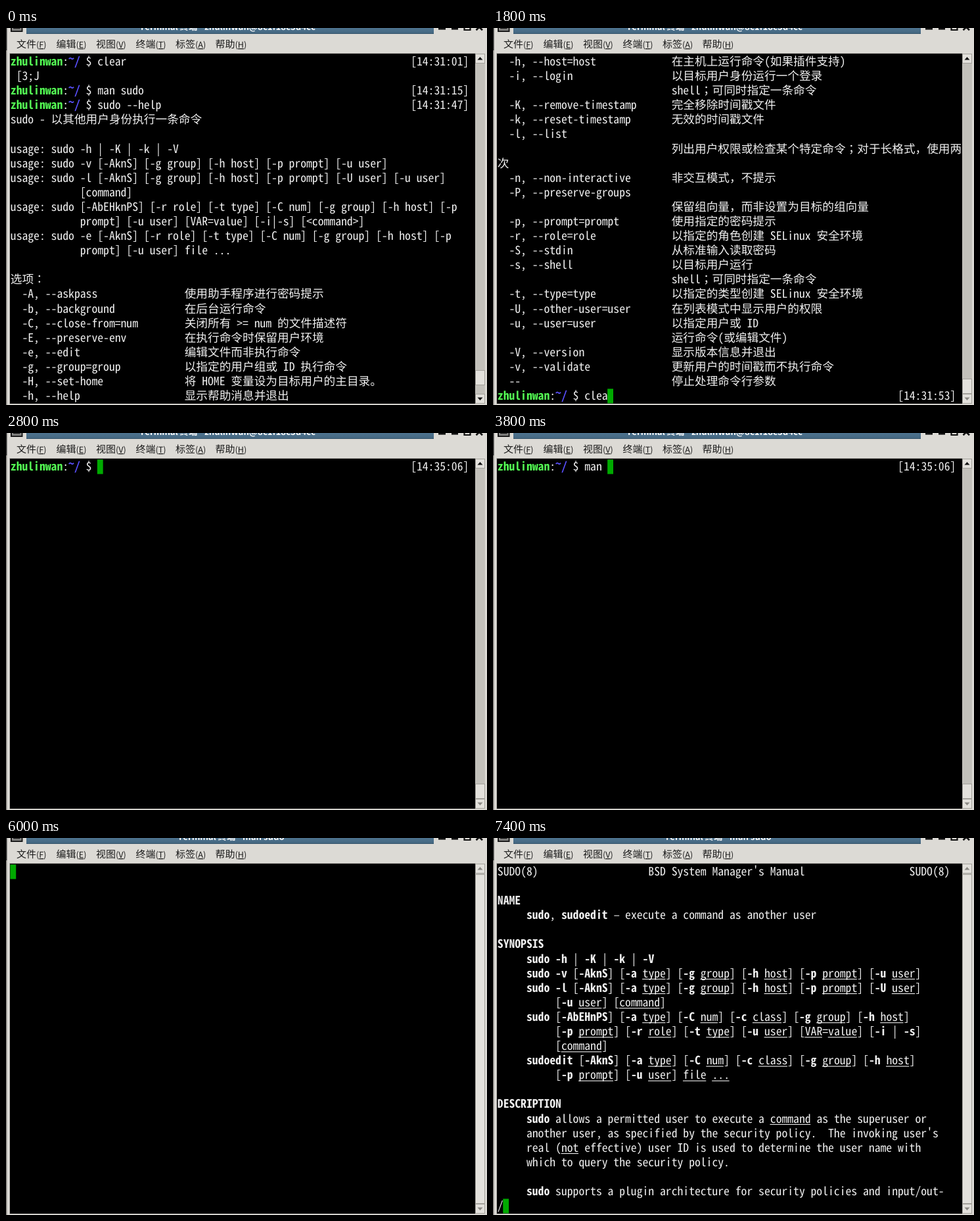
These frames come from a looping animation (732 px wide and 573 px high, 8 s). An HTML page:

```html
<!DOCTYPE html>
<html lang="zh-CN">
<head>
<meta charset="utf-8">
<title>Terminal</title>
<style>
  html, body { margin: 0; width: 100%; height: 100%; overflow: hidden; background: #dcdad5; }
  svg { display: block; width: 732px; height: 573px; }
  text { white-space: pre; text-rendering: geometricPrecision; font-kerning: none; }
  .ui { font-family: "Noto Sans CJK SC", "Noto Sans", sans-serif; fill: #1c1c1c; }
  .latin { font-family: "Noto Sans Mono CJK SC", "Noto Sans Mono", monospace; font-variant-ligatures: none; }
  .han { font: 17.66px "Noto Sans CJK SC", sans-serif; }
  .mid { font: 17.66px "Noto Sans CJK JP", sans-serif; }
  #screen { fill: #f0f0f0; }
  #screen .bold { font-weight: 700; }
  #screen .user { font-weight: 700; fill: #54ff54; }
  #screen .path { font-weight: 700; fill: #5a50ff; }
  #screen .inv { fill: #000; }
  .btn { fill: #e3e1dc; stroke: #a3a19b; }
</style>
</head>
<body>
<svg viewBox="0 0 732 573">
  <defs>
    <linearGradient id="bar" x1="0" y1="0" x2="0" y2="1">
      <stop offset="0" stop-color="#4f7591"/>
      <stop offset="1" stop-color="#43667f"/>
    </linearGradient>
  </defs>
  <rect width="732" height="573" fill="#dcdad5"/>
  <rect width="1.5" height="34" fill="#2b2b2b"/>
  <rect y="34" width="1.5" height="539" fill="#85837f"/>
  <rect x="8" y="-8" width="16.5" height="13" fill="#8b8b89" stroke="#1a1a1a" stroke-width="2"/>
  <rect x="11" y="-4" width="10.5" height="5.5" fill="#2a2a2a"/>
  <rect x="31" y="-1" width="620" height="10" fill="url(#bar)"/>
  <rect x="31" y="8" width="620" height="1" fill="#34536a"/>
  <text id="title" class="ui" y="2.6" font-size="13.2" font-weight="700" style="fill:#fff"></text>
  <g fill="#111">
    <rect x="658" y="0" width="11" height="2.6"/>
    <rect x="678" y="0" width="10" height="2.6"/>
    <path d="M697.5 -6V3H706.5V-6" fill="none" stroke="#111" stroke-width="2.2"/>
    <path d="M715.5 3.2L725 -6M725 3.2L715.5 -6" stroke="#111" stroke-width="2.6"/>
  </g>
  <g id="menu"></g>
  <rect x="5" y="38" width="709.5" height="533.5" fill="#b2b0ab"/>
  <rect x="6" y="39" width="708" height="532" fill="#000"/>
  <rect x="714" y="39" width="15" height="532" fill="#c3c1bb"/>
  <rect class="btn" x="714.5" y="39.5" width="14" height="14"/>
  <rect class="btn" x="714.5" y="556.5" width="14" height="14"/>
  <path id="up" d="M717.5 48.5H725.5L721.5 44Z"/>
  <path id="down" d="M717.5 561.5H725.5L721.5 566Z"/>
  <rect id="thumb" class="btn" x="714.5" width="14"/>
  <g id="screen"></g>
</svg>
<script>
const $ = id => document.getElementById(id);
const CELL = 8.83, ROW = 22.09, LEFT = 6.4, TOP = 40.3, DESC = 30;
const USER = 'zhulinwan';

const HELP = `sudo - 以其他用户身份执行一条命令

usage: sudo -h | -K | -k | -V
usage: sudo -v [-AknS] [-g group] [-h host] [-p prompt] [-u user]
usage: sudo -l [-AknS] [-g group] [-h host] [-p prompt] [-U user] [-u user]
            [command]
usage: sudo [-AbEHknPS] [-r role] [-t type] [-C num] [-g group] [-h host] [-p
            prompt] [-u user] [VAR=value] [-i|-s] [<command>]
usage: sudo -e [-AknS] [-r role] [-t type] [-C num] [-g group] [-h host] [-p
            prompt] [-u user] file ...

选项：
  -A, --askpass\t使用助手程序进行密码提示
  -b, --background\t在后台运行命令
  -C, --close-from=num\t关闭所有 >= num 的文件描述符
  -E, --preserve-env\t在执行命令时保留用户环境
  -e, --edit\t编辑文件而非执行命令
  -g, --group=group\t以指定的用户组或 ID 执行命令
  -H, --set-home\t将 HOME 变量设为目标用户的主目录。
  -h, --help\t显示帮助消息并退出`;

const OPTS = `  -h, --host=host\t在主机上运行命令(如果插件支持)
  -i, --login\t以目标用户身份运行一个登录
\tshell；可同时指定一条命令
  -K, --remove-timestamp\t完全移除时间戳文件
  -k, --reset-timestamp\t无效的时间戳文件
  -l, --list
\t列出用户权限或检查某个特定命令；对于长格式，使用两
次
  -n, --non-interactive\t非交互模式，不提示
  -P, --preserve-groups
\t保留组向量，而非设置为目标的组向量
  -p, --prompt=prompt\t使用指定的密码提示
  -r, --role=role\t以指定的角色创建 SELinux 安全环境
  -S, --stdin\t从标准输入读取密码
  -s, --shell\t以目标用户运行
\tshell；可同时指定一条命令
  -t, --type=type\t以指定的类型创建 SELinux 安全环境
  -U, --other-user=user\t在列表模式中显示用户的权限
  -u, --user=user\t以指定用户或 ID
\t运行命令(或编辑文件)
  -V, --version\t显示版本信息并退出
  -v, --validate\t更新用户的时间戳而不执行命令
  --\t停止处理命令行参数`;

// *bold* and _underlined_
const MAN = `SUDO(8)                   BSD System Manager's Manual                  SUDO(8)

*NAME*
     *sudo*, *sudoedit* – execute a command as another user

*SYNOPSIS*
     *sudo* *-h* | *-K* | *-k* | *-V*
     *sudo* *-v* [*-AknS*] [*-a* _type_] [*-g* _group_] [*-h* _host_] [*-p* _prompt_] [*-u* _user_]
     *sudo* *-l* [*-AknS*] [*-a* _type_] [*-g* _group_] [*-h* _host_] [*-p* _prompt_] [*-U* _user_]
          [*-u* _user_] [_command_]
     *sudo* [*-AbEHnPS*] [*-a* _type_] [*-C* _num_] [*-c* _class_] [*-g* _group_] [*-h* _host_]
          [*-p* _prompt_] [*-r* _role_] [*-t* _type_] [*-u* _user_] [_VAR_=_value_] [*-i* | *-s*]
          [_command_]
     *sudoedit* [*-AknS*] [*-a* _type_] [*-C* _num_] [*-c* _class_] [*-g* _group_] [*-h* _host_]
          [*-p* _prompt_] [*-u* _user_] _file_ _..._

*DESCRIPTION*
     *sudo* allows a permitted user to execute a _command_ as the superuser or
     another user, as specified by the security policy.  The invoking user's
     real (_not_ effective) user ID is used to determine the user name with
     which to query the security policy.

     *sudo* supports a plugin architecture for security policies and input/out-`;

const STATUS = ' Manual page sudo(8) line 1 (press h for help or q to quit)';

const x = col => LEFT + col * CELL;
const y = row => TOP + row * ROW;
const esc = s => s.replace(/&/g, '&amp;').replace(/</g, '&lt;');
const rect = (l, t, w, h, fill) => `<rect x="${l}" y="${t}" width="${w}" height="${h}" fill="${fill}"/>`;
const run = (row, col, s, cls, rise = 0) =>
  `<text x="${x(col) + 0.4}" y="${y(row) + 16.7 - rise}" class="${cls}">${esc(s)}</text>`;
const cursor = (row, col) => rect(x(col), y(row), CELL, ROW, '#00aa00');

const TOKEN = /([\t*_])|([；：])|([⺀-鿿，]+)|(–|[^\t*_；：⺀-鿿，–]+)/g;

function line(row, src) {
  let out = '', col = 0, bold = false, under = false;
  for (const [tok, mark, mid, han] of src.matchAll(TOKEN)) {
    if (mark) {
      if (mark === '\t') col = DESC;
      else if (mark === '*') bold = !bold;
      else under = !under;
      continue;
    }
    const width = tok.length * (mid || han ? 2 : 1);
    const cls = (mid ? 'mid' : han ? 'han' : 'latin') + (bold ? ' bold' : '');
    if (tok.trim()) out += run(row, col, tok, cls);
    if (under) out += rect(x(col), y(row) + 19, width * CELL, 1.1, '#f0f0f0');
    col += width;
  }
  return out;
}

const page = (src, top = 0) => src.split('\n').map((s, i) => line(top + i, s)).join('');

function prompt(row, cmd, time) {
  return run(row, 0, USER, 'latin user') + run(row, 9, ':', 'latin') +
    run(row, 10, '~', 'latin path', 4.5) + run(row, 11, '/', 'latin path') +
    run(row, 13, '$ ' + cmd, 'latin') + run(row, 69, `[${time}]`, 'latin');
}

const typing = (row, cmd, time) => cursor(row, 15 + cmd.length) + prompt(row, cmd, time);

const HOST = [203, `Terminal 终端 - ${USER}@8c1f18c3d4cc`];
const PAGER = [261, 'Terminal 终端 - man sudo'];
const DARK = '#111', DIM = '#8a8883';
const middle = { title: HOST, thumb: [520.5, 22], up: DARK, down: DARK };
const end = { title: HOST, thumb: [533.5, 22], up: DARK, down: DIM };
const full = { title: PAGER, thumb: [55.5, 500], up: DIM, down: DIM };

const help = () => prompt(0, 'clear', '14:31:01') + line(1, ' [3;J') +
  prompt(2, 'man sudo', '14:31:15') + prompt(3, 'sudo --help', '14:31:47') + page(HELP, 4);
const opts = cmd => () => page(OPTS) + typing(23, cmd, '14:31:53');
const shell = cmd => () => typing(0, cmd, '14:35:06');

const SCENES = [
  [0, middle, help],
  [800, end, opts('cl')],
  [1400, end, opts('cle')],
  [1800, end, opts('clea')],
  [2400, end, opts('clear')],
  [2800, end, shell('')],
  [3600, end, shell('man')],
  [3800, end, shell('man ')],
  [5200, end, shell('man su')],
  [5400, end, shell('man sudo')],
  [5800, end, () => prompt(0, 'man sudo', '14:35:06') + cursor(1, 0)],
  [6000, full, () => cursor(0, 0)],
  [6400, full, () => page(MAN) + rect(x(0), y(23), STATUS.length * CELL, ROW, '#f0f0f0') +
    run(23, 0, STATUS, 'latin inv') + cursor(23, STATUS.length)],
  [7400, full, () => page(MAN) + run(23, 0, '/', 'latin') + cursor(23, 1)]
];
const LOOP = 8000;

// Size the Latin face so that one advance fills one cell.
function fitLatin() {
  const ctx = document.createElement('canvas').getContext('2d');
  ctx.font = '100px "Noto Sans Mono CJK SC", "Noto Sans Mono", monospace';
  $('screen').style.fontSize = CELL * 100 / ctx.measureText('M').width + 'px';
}

function drawMenu() {
  const items = ['文件F', '编辑E', '视图V', '终端T', '标签A', '帮助H'];
  $('menu').innerHTML = items.map((s, i) =>
    `<text class="ui" x="${16 + i * 60.5}" y="30" font-size="15">${s.slice(0, 2)}<tspan font-size="12.6">(<tspan text-decoration="underline">${s[2]}</tspan>)</tspan></text>`
  ).join('');
}

let shown = null;
function render(ms) {
  const t = ms % LOOP;
  const scene = SCENES.filter(s => s[0] <= t).pop();
  if (scene === shown) return;
  shown = scene;
  const [, look, draw] = scene;
  $('screen').innerHTML = draw();
  $('title').setAttribute('x', look.title[0]);
  $('title').textContent = look.title[1];
  $('thumb').setAttribute('y', look.thumb[0]);
  $('thumb').setAttribute('height', look.thumb[1]);
  $('up').setAttribute('fill', look.up);
  $('down').setAttribute('fill', look.down);
}

fitLatin();
drawMenu();
render(0);
const start = performance.now();
function tick() {
  render(performance.now() - start);
  requestAnimationFrame(tick);
}
requestAnimationFrame(tick);
</script>
</body>
</html>
```
